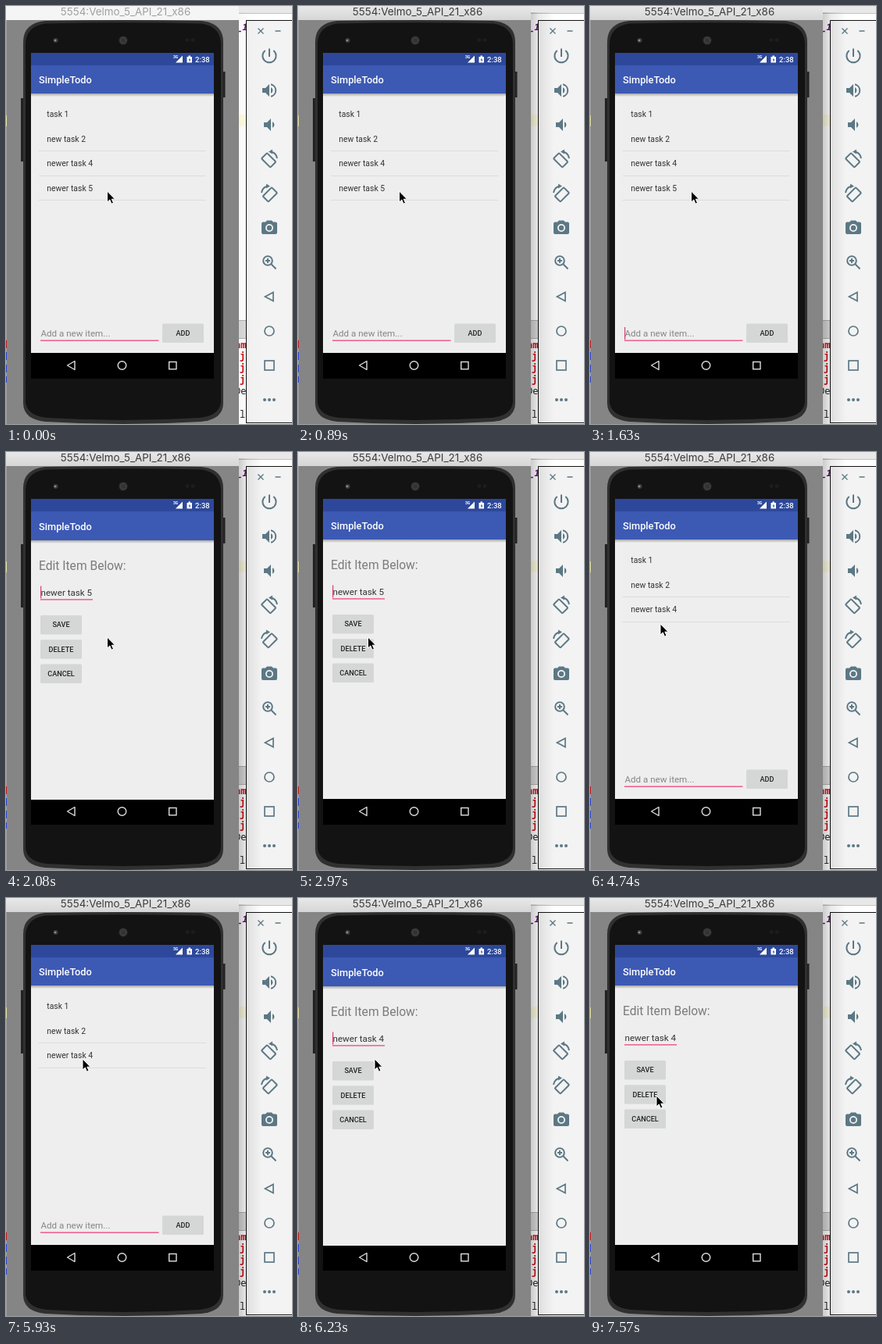
Recreate the animation shown at these times as an HTML page. Size 366 by 535 pixels, loop 8000 ms.

```html
<!DOCTYPE html>
<html lang="en">
<head>
<meta charset="utf-8">
<title>Todo emulator</title>
<style>
  html, body { margin: 0; width: 100%; height: 100%; overflow: hidden; background: #fff; }
  svg { display: block; width: 366px; height: 535px; }
  text { font-family: Roboto, sans-serif; fill: #333; white-space: pre; }
  .mid { text-anchor: middle; }
  .title { font: 500 12.8px Roboto, sans-serif; fill: #fff; }
  .row { font-size: 10.4px; }
  .button { font-size: 9.1px; font-weight: 500; fill: #222; }
  .log { font: bold 12px "Noto Sans Mono", monospace; fill: #d0121b; }
  .caption { font: 13.4px Inter, sans-serif; }
  .line { fill: none; stroke: #5c7885; stroke-width: 2; }
  .thin { stroke-width: 1.7; }
  .solid { fill: #5c7885; }
</style>
</head>
<body>
<svg viewBox="0 0 366 535">
  <defs>
    <linearGradient id="shade"><stop stop-color="#000" stop-opacity=".2"/><stop offset=".35" stop-color="#000" stop-opacity=".08"/><stop offset="1" stop-color="#000" stop-opacity="0"/></linearGradient>
    <linearGradient id="drop" x2="0" y2="1"><stop stop-color="#000" stop-opacity=".3"/><stop offset="1" stop-color="#000" stop-opacity="0"/></linearGradient>
    <linearGradient id="metal" x2="0" y2="1"><stop stop-color="#e8e8e8"/><stop offset="1" stop-color="#d6d6d6"/></linearGradient>
    <clipPath id="screen"><rect x="32" y="76" width="234" height="401"/></clipPath>
  </defs>

  <!-- desktop behind the emulator -->
  <rect width="366" height="535" fill="#fff"/>
  <rect x="298" width="68" height="9" fill="#e8e8e8"/>
  <rect x="298" y="9" width="68" height="1" fill="#c4c4c4"/>
  <rect x="298" y="139" width="10" height="15" fill="#fffbe0"/>
  <rect x="298" y="402" width="10" height="24" fill="#d9d9d9"/>
  <path d="M298 402.5h10M298 425.5h10" stroke="#b0b0b0"/>
  <g id="log"></g>

  <!-- tool panel -->
  <rect x="307.5" y="18.5" width="70" height="515" fill="#f3f3f3" stroke="#111"/>
  <g id="tools"></g>
  <rect id="shadow" x="298" y="8" width="30" height="527" fill="url(#shade)"/>

  <!-- emulator window -->
  <rect y="18" width="298" height="517" fill="#858585"/>
  <rect id="bar" width="298" height="18"/>
  <text id="caption" class="caption mid" x="153" y="12">5554:Velmo_5_API_21_x86</text>
  <path d="M.5 18V535" stroke="#a2a2a2"/>
  <path d="M.5 140v14" stroke="#e9e3a5"/>
  <path d="M.5 428v10" stroke="#d0121b"/>
  <path d="M.5 443v10m0 6v10m0 5v8" stroke="#2746d8"/>
  <path d="M20.5 118v81M279 84v33" stroke="#222" stroke-width="3"/>
  <path d="M22 46Q22 22 50 19Q150 17 250 19Q278 22 278 46V508Q278 529 250 532Q150 538 50 532Q22 529 22 508Z" fill="#303030"/>
  <path d="M25 48Q26 26 50 22.500Q150 20 250 22.500Q274 26 275 48V506Q274 524 248 527Q150 533 52 527Q26 524 25 506Z" fill="#131313"/>
  <circle cx="63.500" cy="44" r="3" fill="#3b3d42"/><circle cx="63" cy="44" r="1.300" fill="#8b9099"/>
  <circle cx="150" cy="44" r="5.500" fill="#333"/><circle cx="150" cy="44" r="3.500" fill="none" stroke="#555" stroke-dasharray="1 1"/>
  <circle cx="232" cy="43.500" r="2.500" fill="#1d1d1f"/><circle cx="239" cy="43.500" r="2.500" fill="#1d1d1f"/>

  <!-- device screen -->
  <rect x="32" y="60" width="234" height="417" fill="#000"/>
  <rect x="32" y="60" width="234" height="16" fill="#2d489b"/>
  <g clip-path="url(#screen)">
    <g id="list"></g>
    <g id="edit"></g>
  </g>
  <text x="214" y="67" style="font-size:5px;font-weight:700;fill:#fff">3G</text>
  <path d="M217 72.500L226 63.500V72.500Z" fill="#fff"/>
  <path d="M231.500 65h2v-1.500h2.500v1.500h2v7.500h-6.500Z" fill="#fff"/>
  <path d="M235.500 66l-2 3.500h1.500l-.5 2.500l2-3.500h-1.500z" fill="#2d489b"/>
  <text x="242" y="72" style="font-size:9.500px;font-weight:500;fill:#fff">2:38</text>
  <g fill="none" stroke="#ddd" stroke-width="1.400">
    <path d="M88 454.500V465.500L78.500 460Z" stroke-linejoin="round"/>
    <circle cx="148.500" cy="460" r="5.300"/>
    <rect x="208.700" y="455.500" width="9.300" height="9.300"/>
  </g>

  <path id="pointer" d="M0 0V14L3.300 11L5.500 16.200L8 15.100L5.800 10.200H10Z" fill="#000" stroke="#fff" stroke-width="1"/>
</svg>
<script>
const $ = id => document.getElementById(id);
const LOOP = 8000;

const text = (x, y, cls, s, extra = "") => `<text x="${x}" y="${y}" class="${cls}" ${extra}>${s}</text>`;
const rect = (x, y, w, h, fill, extra = "") =>
  `<rect x="${x}" y="${y}" width="${w}" height="${h}" fill="${fill}" ${extra}/>`;
const button = (x, y, label) =>
  rect(x, y, 53, 24.5, "#d5d7d7", 'rx="1.5"') + text(x + 26.5, y + 15.3, "button mid", label);
const caret = (id, y) => rect(44, y, 1.3, 16, "#d8487c", `id="${id}"`);
const appBar = () =>
  rect(32, 76, 234, 368, "#eee") + rect(32, 112, 234, 4, "url(#drop)") +
  rect(32, 76, 234, 36, "#3c59b4") + text(42, 98.7, "title", "SimpleTodo");

const tasks = ["task 1", "new task 2", "newer task 4", "newer task 5"];
const rows = tasks.map((name, i) => {
  const y = 141.8 + i * 31.7;
  const rule = i ? rect(42, Math.round(y + 11.5), 214, 1, "#dcdcdc") : "";
  return `<g id="row${i}">${text(52.3, y, "row", name)}${rule}</g>`;
}).join("");

$("list").innerHTML = appBar() + rows +
  text(44.5, 423.3, "", "Add a new item...", 'style="font-size:11.6px;fill:#858585"') +
  rect(44, 427.5, 151.5, 1.4, "#f0528a") + caret("addCaret", 411) + button(200, 406.5, "ADD");

$("edit").innerHTML = appBar() + rect(32, 60, 234, 16, "#2d489b", 'id="band"') +
  text(42, 149.7, "", "Edit Item Below:", 'style="font-size:15.6px;fill:#7b7b7b"') +
  text(44.5, 183.3, "", "", 'id="field" style="font-size:11.6px"') +
  rect(44, 187.2, 67, 1.4, "#f0528a") + caret("editCaret", 170.5) +
  ["SAVE", "DELETE", "CANCEL"].map((s, i) => button(44, 208 + i * 31.2, s)).join("");

const plain = 'style="font-weight:400;fill:#222"';
$("log").innerHTML =
  text(294, 31, "log", "_1", 'style="fill:#660e7a;font-style:italic"') +
  text(293, 438, "log", "am") +
  [452, 467, 482].map(y => text(299, y, "log", "j")).join("") +
  text(293, 497, "log", "De", plain) + text(299, 527, "log", "l,", plain);

// Each icon is drawn around its own centre.
const line = d => `<path class="line" d="${d}"/>`;
const solid = d => `<path class="solid" d="${d}"/>`;
const speaker = x => solid(`M${x} -3h4l5 -5v16l-5 -5h-4Z`);
const rotate = '<rect class="line" x="-5.500" y="-8" width="10" height="16" rx="1" transform="translate(-.5 1) rotate(-45)"/>' +
  line("M1 -9.500Q8.500 -9 10 -1") + solid("M-1 -9.500l5 -3v6Z");
const icons = [
  line("M0 -9.500V1M-5.300 -7A8.600 8.600 0 1 0 5.300 -7"),
  speaker(-9) + solid("M2 -4a4.500 4.500 0 0 1 0 8Z") + line("M2 -7.800a8 8 0 0 1 0 15.600"),
  speaker(-7) + solid("M4 -4a4.500 4.500 0 0 1 0 8Z"),
  rotate,
  `<g transform="scale(-1 1)">${rotate}</g>`,
  solid("M-3 -9.500h6l2 2h3q2 0 2 2V6q0 2 -2 2H-8q-2 0 -2 -2V-5.500q0 -2 2 -2h3Z") +
    '<circle r="4.100" fill="#5c7885" stroke="#f3f3f3" stroke-width="1.800"/>',
  '<circle class="line" cx="-2" cy="-2" r="5.800"/>' + line("M2.500 2.500L8.500 8.500M-2 -5v6M-5 -2h6"),
  '<path class="line thin" d="M5 -5.500V5.500L-5.500 0Z"/>',
  '<circle class="line thin" r="6"/>',
  '<rect class="line thin" x="-6" y="-6" width="12" height="12"/>',
  [-6, 0, 6].map(x => `<circle class="solid" cx="${x}" r="2"/>`).join("")
];
$("tools").innerHTML =
  '<path class="line" style="stroke-width:1.300" d="M322.500 28.500l7 7m0 -7l-7 7M344.500 32h7"/>' +
  icons.map((d, i) => `<g transform="translate(337 ${64 + i * 44})">${d}</g>`).join("");

// Steps: [start, value...]; the last one already begun applies.
const at = (steps, t) => steps.findLast(s => s[0] <= t);

const pointer = [
  [0, 129.5, 237], [2820, 112, 236], [2970, 89.5, 237], [3110, 80, 242], [3260, 73, 247],
  [4740, 90, 220], [4880, 98, 206], [6530, 98, 232], [6680, 97, 262],
  [6830, 92, 259], [6970, 88, 255], [7120, 85, 253]
];
const addBlink = [[0, 0], [440, 1], [890, 0], [1490, 1], [4150, 0], [4290, 1], [4740, 0], [5330, 1], [5780, 0]];
const editBlink = [[0, 0], [2080, 1], [2530, 0], [2970, 1], [3560, 0], [6230, 1], [6680, 0], [7120, 1], [7570, 0]];
// start, opacity, vertical offset
const editPose = [
  [0, 0, 0], [1930, .6, 17], [2080, 1, 1], [2230, 1, 0], [4000, 1, 2], [4150, 0, 0],
  [6080, .6, 17], [6230, 1, 1], [6380, 1, 0]
];

function draw(t) {
  const active = t >= 140, deleted = t >= 4000;
  const [, x, y] = at(pointer, t);
  const [start, alpha, dy] = at(editPose, t);
  $("bar").setAttribute("fill", active ? "url(#metal)" : "#f5f5f5");
  $("caption").style.fill = active ? "#3c3c3c" : "#a0a0a0";
  $("shadow").style.opacity = active ? 1 : .15;
  $("row3").style.opacity = deleted ? 0 : 1;
  $("addCaret").style.opacity = at(addBlink, t)[1];
  $("editCaret").style.opacity = at(editBlink, t)[1];
  $("field").textContent = t < 4150 ? tasks[3] : tasks[2];
  $("edit").style.opacity = alpha;
  $("edit").setAttribute("transform", `translate(0 ${dy})`);
  $("band").style.opacity = start === 4000 ? 1 : 0;
  $("pointer").setAttribute("transform", `translate(${x} ${y})`);
}

const begin = performance.now();
function tick() {
  draw((performance.now() - begin) % LOOP);
  requestAnimationFrame(tick);
}
tick();
</script>
</body>
</html>
```
